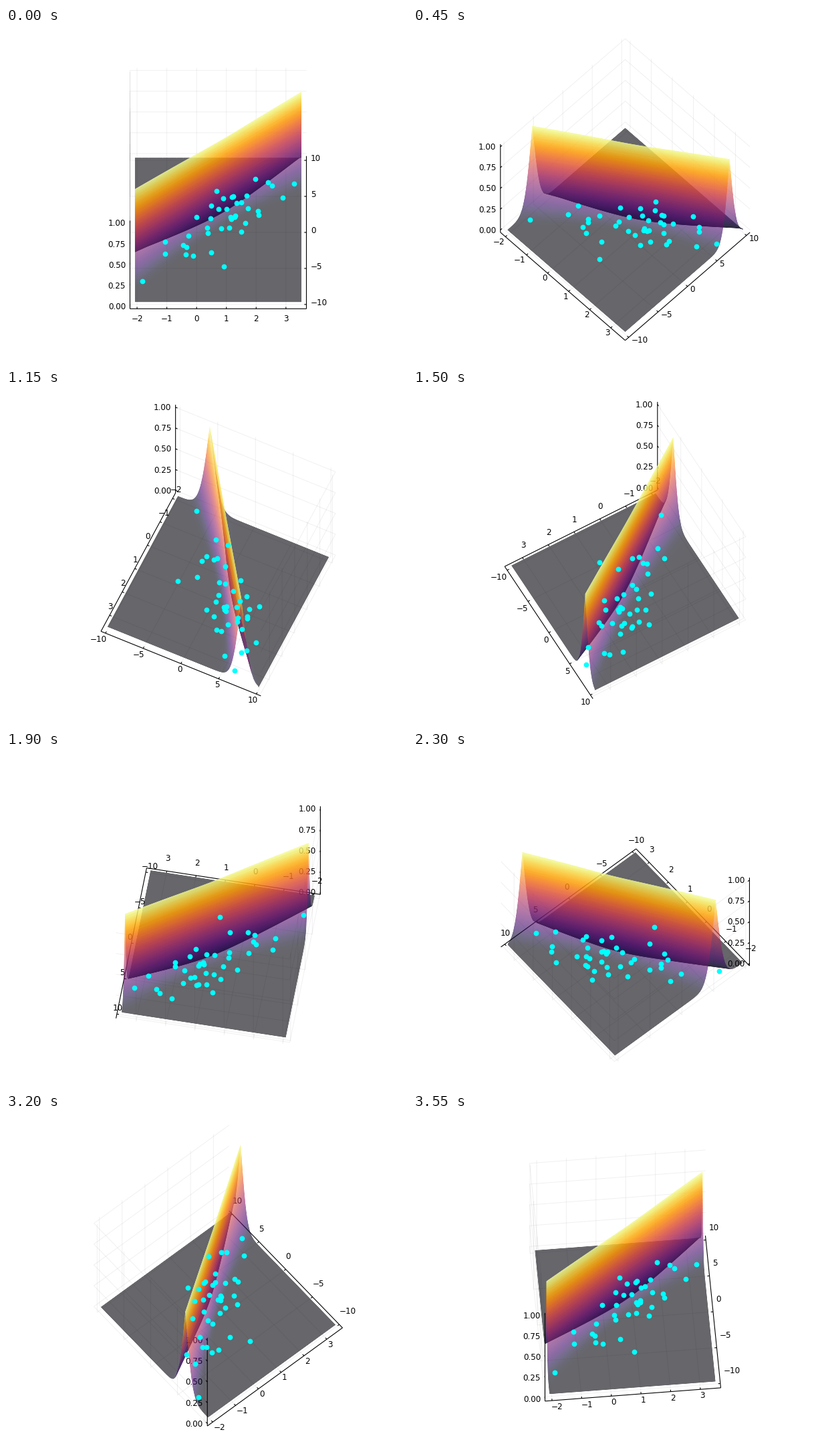
A matplotlib script that plays this animation: 600x500 px, repeating every 3600 ms.

```python
import math

import numpy as np
import matplotlib.pyplot as plt
from matplotlib.animation import FuncAnimation
from matplotlib.collections import LineCollection, PolyCollection

W, H = 600, 500
PX = 0.72                      # points per pixel at 100 dpi
SIDE, CX, CY = 264, 317.5, 240  # cube edge and centre on the stage
ELEV = math.radians(60)
FRAMES = 72
OPACITY = .635
BLUNT = .012                   # rounding of the crest, in units of y

# Sample data
px = np.array([
    -1.82, -1.06, -1.07, -.45, -.35, -.28, -.36, -.12, 0, .35,
    .38, .47, .48, .49, .66, .74, .90, .83, 1.01, .91,
    1.10, 1.13, 1.17, 1.18, 1.24, 1.27, 1.29, 1.35, 1.49, 1.51,
    1.64, 1.69, 1.72, 1.97, 2.06, 2.09, 2.39, 2.53, 2.88, 3.27])
py = np.array([
    -7.13, -1.67, -3.33, -2.08, -2.41, -.79, -3.38, -3.61, 1.76, .28,
    -.42, 1.57, 3.38, -3.15, 5.37, 2.87, 4.40, .19, 2.87, -5.09,
    .32, 1.76, 1.48, 4.58, 4.68, 1.76, 1.99, 3.70, 3.84, -.23,
    .97, 4.72, 2.96, 7.08, 2.64, 2.08, 6.57, 6.11, 4.44, 6.39])

# Least squares line and the standard error of its mean
dof = len(px) - 2
slope, icept = np.polyfit(px, py, 1)
resid = py - icept - slope * px
xm, sxx = px.mean(), ((px - px.mean()) ** 2).sum()
xs = np.linspace(px.min() - .25, px.max() + .25, 25)
mu = icept + slope * xs
se = np.sqrt((resid ** 2).sum() / dof * (1 / len(px) + (xs - xm) ** 2 / sxx))

erfc = np.vectorize(math.erfc)


def p_value(t):
    """Two-sided p-value of Student's t, by a normal approximation."""
    w = np.abs(t) * (1 - 1 / (4 * dof)) / np.sqrt(1 + t * t / (2 * dof))
    return erfc(w / math.sqrt(2))


def padded(lo, hi):
    pad = .03 * (hi - lo)
    return lo - pad, hi + pad


x0, x1 = padded(xs[0], xs[-1])
y0, y1 = padded(-10, 10)
z0, z1 = padded(0, 1)


def project(x, y, z, az):
    u = (x - x0) / (x1 - x0) - .5
    v = (y - y0) / (y1 - y0) - .5
    w = (z - z0) / (z1 - z0) - .5
    c, s = math.cos(az), math.sin(az)
    depth = v * c - u * s
    return (CX + SIDE * (u * c + v * s),
            CY - SIDE * (depth * math.sin(ELEV) + w * math.cos(ELEV)))


def project_line(pts, az):
    return np.column_stack(project(*np.array(pts, float).T, az))


# Each tick: the start on its axis, then the path of its grid line
xt, yt, zt = range(-2, 4), range(-10, 11, 5), np.arange(5) / 4
grid_paths = ([[(t, y0, z0), (t, y1, z0), (t, y1, z1)] for t in xt]
              + [[(x1, t, z0), (x0, t, z0), (x0, t, z1)] for t in yt]
              + [[(x0, y0, t), (x0, y1, t), (x1, y1, t)] for t in zt])
axis_paths = [[(x0, y0, z0), (x1, y0, z0)],
              [(x1, y0, z0), (x1, y1, z0)],
              [(x0, y0, z0), (x0, y0, z1)]]
for a, b, _ in grid_paths:
    a, b = np.array(a), np.array(b)
    axis_paths.append([a, a + .012 * (b - a)])

labels = ([("x", f"{t}".replace("-", "\u2212")) for t in xt]
          + [("y", f"{t}".replace("-", "\u2212")) for t in yt]
          + [("z", f"{t:.2f}") for t in zt])


def label_anchor(axis, deg):
    """Alignment and pixel offset of the tick labels of one axis."""
    if axis == "z":
        return "right", -6.5, 0
    phi = (deg - 90 * (axis == "y")) % 360
    if phi == 0:
        return "center", 0, 14
    c, s = math.cos(math.radians(phi)), math.sin(math.radians(phi))
    quad = 0 if phi <= 90 else phi // 90
    if axis == "x":
        return [("right", 3.5 - 9 * s * s, 2.8 + 5.8 * c),
                ("left", -3, -8 + 12.7 * c),
                ("left", -3 + 5 * s * s, -19.3),
                ("left", -1 + 5.2 * s * s, 2.8 + 5.8 * c)][quad]
    return [("right", 2.5 - 3.3 * s * s, 6.8 + 4 * s),
            ("left", -6.3, -7 + 13.3 * c),
            ("left", -7 + 11.5 * s * s, -19.3 + 1.2 * c),
            ("left", 2.8 + 3.7 * s ** 4, -3.7 + 10.5 * c)][quad]


fine_t = np.linspace(-5, 5, 601)
fine_p = p_value(fine_t)
inferno = plt.get_cmap("inferno")


def level_rows(az):
    """Values of t whose level lines lie about two pixels apart on screen."""
    u, v = project(xs[0], mu[0] + fine_t * se[0], fine_p, az)
    ua, va = project(xs[0], mu[0], 0, az)
    ub, vb = project(xs[-1], mu[-1], 0, az)
    du, dv = ub - ua, vb - va
    step = np.abs(np.diff(u) * dv - np.diff(v) * du) / math.hypot(du, dv)
    count = np.floor(np.cumsum(step) / 1.8)
    keep = np.flatnonzero(np.diff(count) > 0) + 1
    return np.union1d(fine_t[keep], [-60, 0, 60])


def surface_layers(az):
    """Cells and colours of the three overlapping layers, far to near."""
    t = level_rows(az)
    y = np.clip(mu + np.outer(t, se), -10, 10)
    z = p_value(np.hypot(t[:, None], BLUNT / se))
    pts = np.stack(project(xs, y, z, az), axis=-1)
    a, b, c, d = pts[:-1, :-1], pts[:-1, 1:], pts[1:, 1:], pts[1:, :-1]
    cells = np.stack([a, b, c, d], axis=2)
    height = (z[:-1, :-1] + z[:-1, 1:] + z[1:, 1:] + z[1:, :-1]) / 4
    colors = inferno(.015 + .985 * height)

    p, q = c - a, b - d
    front = p[..., 0] * q[..., 1] - p[..., 1] * q[..., 0] > 0
    lean = math.cos(az) + slope * (x1 - x0) / (y1 - y0) * math.sin(az)
    far = ((t[:-1] + t[1:]) * lean > 0)[:, None]
    for mask in (far & front, far & ~front, ~far & (front | ~front)):
        yield cells[mask], colors[mask]


def fade(img, dpi):
    """Close the hairline seams of a layer, then make it translucent."""
    img = np.array(img)
    img[..., 3] = OPACITY * np.minimum(1, 1.5 * img[..., 3])
    return img, 0, 0


fig = plt.figure(figsize=(W / 100, H / 100), dpi=100, facecolor="white")
ax = fig.add_axes([0, 0, 1, 1])
ax.set(xlim=(0, W), ylim=(H, 0))
ax.axis("off")


def add_lines(color, width, zorder):
    lines = LineCollection([], colors=[color], linewidths=width * PX,
                           zorder=zorder, snap=False)
    return ax.add_collection(lines, autolim=False)


def add_layer(zorder):
    layer = PolyCollection([], linewidths=0, edgecolors="none", zorder=zorder)
    layer.set_agg_filter(fade)
    return ax.add_collection(layer, autolim=False)


grid = add_lines((0, 0, 0, .06), 1, 1)
axes = add_lines("black", 1.1, 2)
layers = [add_layer(4 + n) for n in range(3)]
dots = ax.scatter(px, py, s=(7.8 * PX) ** 2, c="cyan", linewidths=0, zorder=8)
texts = [ax.text(0, 0, s, family="DejaVu Sans", size=12 * PX, color="black",
                 va="baseline", zorder=3) for _, s in labels]


def draw(i):
    deg = i * 360 // FRAMES
    az = math.radians(deg)
    lines = [project_line(p, az) for p in grid_paths]
    grid.set_segments(lines)
    axes.set_segments([project_line(p, az) for p in axis_paths])
    for text, line, (axis, _) in zip(texts, lines, labels):
        align, dx, dy = label_anchor(axis, deg)
        text.set_ha(align)
        text.set_position((line[0, 0] + dx, line[0, 1] + dy + 4.4))
    for layer, (cells, colors) in zip(layers, surface_layers(az)):
        layer.set_verts(cells)
        layer.set_facecolor(colors)
    dots.set_offsets(np.column_stack(project(px, py, 0, az)))
    return [grid, axes, *layers, dots, *texts]


anim = FuncAnimation(fig, draw, frames=FRAMES, interval=50, repeat=True,
                     repeat_delay=0, blit=False)
plt.show()
```
